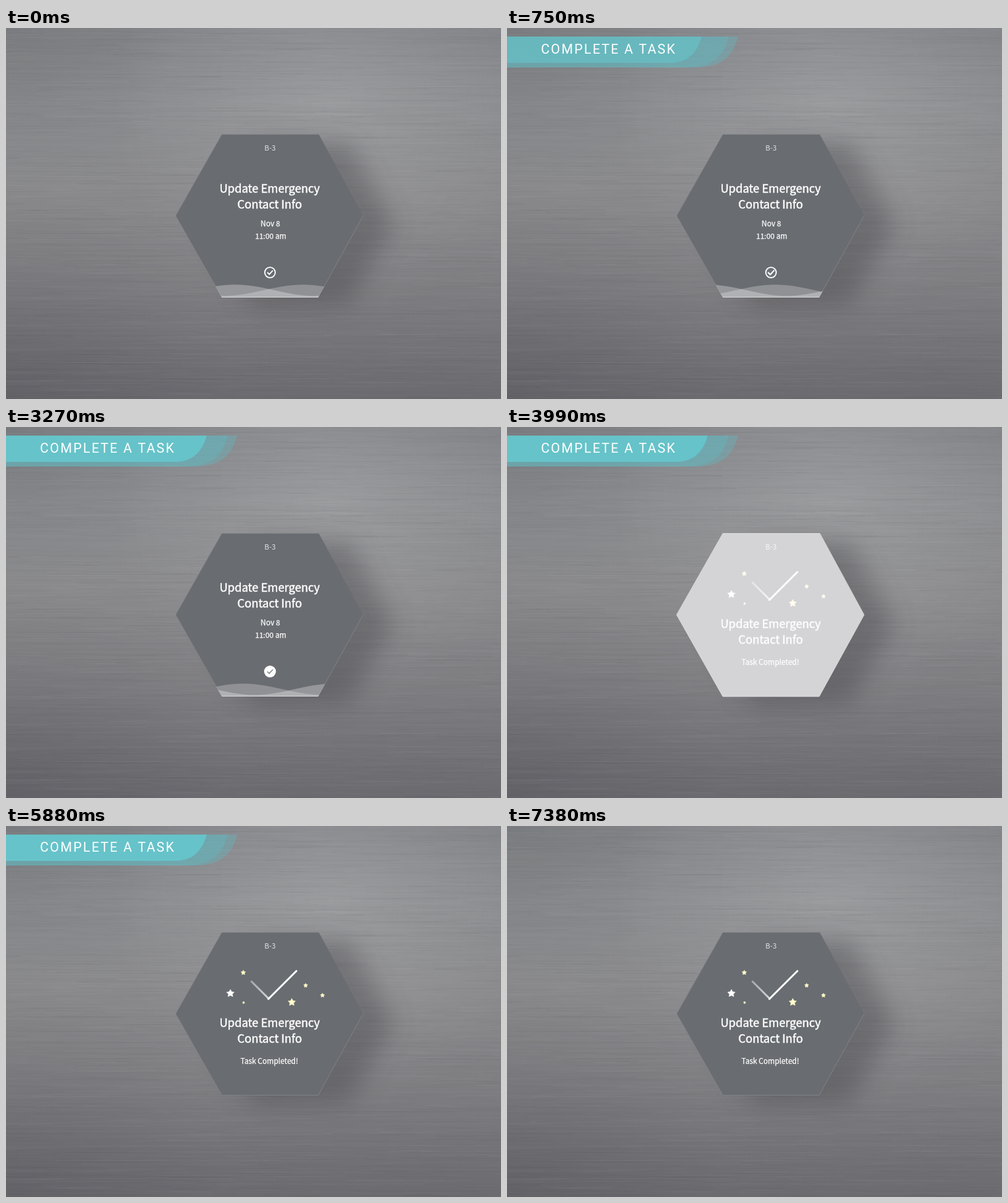
An HTML page with a canvas that plays this animation: 750 px wide and 563 px high, repeating every 7620 ms.

```html
<!DOCTYPE html>
<html lang="en">
<head>
<meta charset="utf-8">
<title>Complete a task</title>
<style>
  html, body { margin: 0; width: 100%; height: 100%; overflow: hidden; background: #838387; }
  canvas, svg { position: absolute; left: 0; top: 0; width: 750px; height: 563px; }
  text { fill: #fff; text-anchor: middle; font-family: "Noto Sans CJK SC", "Noto Sans CJK JP", "Noto Sans", sans-serif; }
  .title { font-size: 17.2px; stroke: #fff; stroke-width: .45px; }
  .small { font-size: 11.2px; stroke: #fff; stroke-width: .25px; }
  .tag { font-size: 11px; fill: #e2e3e4; }
  .label { font: 20px Roboto, sans-serif; letter-spacing: 2.1px; text-anchor: start; }
</style>
</head>
<body>
<canvas id="metal" width="750" height="563"></canvas>
<svg viewBox="0 0 750 563">
  <defs>
    <path id="hex" d="M327 161.500H474L541 285 473 409H327L257 285Z"/>
    <clipPath id="inside"><use href="#hex"/></clipPath>
    <filter id="soft" x="-50%" y="-50%" width="200%" height="200%"><feGaussianBlur stdDeviation="19"/></filter>
    <linearGradient id="shortArm" gradientUnits="userSpaceOnUse" x1="372" y1="236" x2="398" y2="262">
      <stop stop-color="#a9abad"/><stop offset="1" stop-color="#d5d6d7"/>
    </linearGradient>
  </defs>

  <use href="#hex" transform="translate(46 13)" fill="#38383c" opacity=".36" filter="url(#soft)"/>
  <use href="#hex" fill="#696c70"/>
  <path d="M257 285L327 161.500H474" fill="none" stroke="#808387" stroke-width=".8"/>
  <path d="M257 285L327 408.500H473L541 285" fill="none" stroke="#85888b" stroke-width=".8"/>
  <text class="tag" x="400" y="186.300">B-3</text>

  <g id="todo">
    <g clip-path="url(#inside)" fill="#fff">
      <path id="waveA" opacity=".29"/>
      <path id="waveB" opacity=".25"/>
      <path d="M327 408.500H473" stroke="#d5d7d7"/>
    </g>
    <text class="title" x="399.500" y="249.700">Update Emergency</text>
    <text class="title" x="399.500" y="273.700">Contact Info</text>
    <text class="small" x="400.500" y="301.300">Nov 8</text>
    <text class="small" x="401" y="320.300">11:00 am</text>
    <g transform="translate(400 371)" fill="none" stroke-linecap="round" stroke-linejoin="round">
      <circle r="7.900" stroke="#fff" stroke-width="1.800"/>
      <path id="tick" d="M-3.600 .3L-1 2.900 3.800-2.500" stroke="#fff" stroke-width="1.800"/>
      <circle id="disc" r="8.700" fill="#fff"/>
      <path id="doneTick" d="M-3.800 .4L-1.200 3 4-2.600" stroke="#74777b" stroke-width="1.300"/>
    </g>
  </g>

  <g id="done">
    <path d="M372 236L398 262" stroke="url(#shortArm)" stroke-width="2.800" stroke-linecap="round"/>
    <path d="M397.500 262.500L440 220" stroke="#fff" stroke-width="2.800" stroke-linecap="round"/>
    <g id="stars"></g>
    <text class="title" x="399.500" y="304.700">Update Emergency</text>
    <text class="title" x="399.500" y="328.700">Contact Info</text>
    <text class="small" x="399" y="361.300">Task Completed!</text>
    <use id="flash" href="#hex" fill="#fffdff" stroke="#fffdff"/>
  </g>

  <g id="banner">
    <path id="back" d="M-400 13H350C343 42 326 60 286 60H-400Z" fill="#5fb9c1" opacity=".36"/>
    <path id="middle" d="M-400 13H336C329 42 312 60 272 60H-400Z" fill="#5fb9c1" opacity=".36"/>
    <path id="front" d="M-400 13H304C298 36 284 53 255 53H-400Z" fill="#66c3c9"/>
    <text id="label" class="label" x="51.500" y="38.500">COMPLETE A TASK</text>
  </g>
</svg>
<script>
const LOOP = 7620, DONE_AT = 3930, EXIT_AT = 7030;
const el = id => document.getElementById(id);
const ramp = (t, from, to) => Math.min(1, Math.max(0, (t - from) / (to - from)));
const easeOut = p => 1 - (1 - p) ** 3;

function drawMetal() {
  const c = el('metal').getContext('2d');
  let seed = 7;
  const rnd = () => (seed = seed * 16807 % 2147483647) / 2147483647;
  const base = c.createLinearGradient(0, 0, 0, 563);
  [[0, '#818387'], [.2, '#8b8c8f'], [.45, '#8a8a8d'], [.7, '#7e7e82'], [1, '#6a6a6f']]
    .forEach(([at, color]) => base.addColorStop(at, color));
  c.fillStyle = base;
  c.fillRect(0, 0, 750, 563);
  const glow = (x, y, r, rgb, a) => {
    const g = c.createRadialGradient(x, y, 0, x, y, r);
    g.addColorStop(0, `rgba(${rgb},${a})`);
    g.addColorStop(1, `rgba(${rgb},0)`);
    c.fillStyle = g;
    c.fillRect(0, 0, 750, 563);
  };
  glow(490, 110, 330, '255,255,255', .13);
  glow(0, 563, 330, '60,60,66', .2);
  glow(0, 0, 260, '70,74,78', .15);
  for (let i = 0; i < 4200; i++) {
    const tone = rnd() < .5 ? 220 : 40, length = 30 + 200 * rnd() ** 2;
    c.fillStyle = `rgba(${tone},${tone},${tone},${.01 + .02 * rnd()})`;
    c.fillRect(rnd() * 900 - 150, rnd() * 563, length, .6 + rnd());
  }
}

function star(x, y, r, color) {
  let d = '';
  for (let i = 0; i < 10; i++) {
    const a = i * Math.PI / 5 - Math.PI / 2, k = i % 2 ? r * .52 : r;
    d += (i ? 'L' : 'M') + (x + k * Math.cos(a)) + ' ' + (y + k * Math.sin(a));
  }
  return `<path d="${d}Z" fill="${color}" stroke="${color}" stroke-width=".6" stroke-linejoin="round"/>`;
}

function wave(crest) {
  let d = 'M310 412';
  for (let x = 310; x <= 490; x += 4)
    d += `L${x} ${398 - 8.500 * Math.cos((x - crest) * Math.PI / 120)}`;
  return d + 'L490 412Z';
}

const slide = (id, x) => el(id).setAttribute('transform', `translate(${x} 0)`);
const fade = (id, a) => el(id).setAttribute('opacity', a);
const show = (id, on) => el(id).setAttribute('visibility', on ? 'visible' : 'hidden');

function render(t) {
  const done = t >= DONE_AT;
  show('todo', !done);
  show('done', done);

  const drift = Math.min(t, 1560) * .058;
  el('waveA').setAttribute('d', wave(347 - drift));
  el('waveB').setAttribute('d', wave(450 - drift));

  el('tick').setAttribute('transform', `scale(${1 + .3 * ramp(t, 600, 900)})`);
  fade('disc', ramp(t, 720, 1500));
  fade('doneTick', ramp(t, 1900, 3030));
  fade('flash', .8 * (1 - ramp(t, DONE_AT, 4800)) ** 1.5);

  const enter = (from, to) => -370 * (1 - easeOut(ramp(t, from, to)));
  show('banner', t >= 30 && t < 7380);
  slide('back', enter(0, 690));
  slide('middle', enter(40, 780));
  slide('label', enter(0, 690));
  slide('front', enter(100, 1020));
  fade('front', .6 + .4 * ramp(t, 500, 2400));
  slide('banner', -370 * ramp(t, EXIT_AT, 7380) ** 2);
}

const cream = '#fffcc9';
el('stars').innerHTML = star(340, 254, 6, '#fff') + [
  [359.5, 222.5, 3.7], [360, 268, 1.9], [433, 267.5, 5.8], [454, 242, 3.3], [479.5, 257, 3.3]
].map(s => star(...s, cream)).join('');

drawMetal();
const start = performance.now();
function tick() {
  render((performance.now() - start) % LOOP);
  requestAnimationFrame(tick);
}
tick();
</script>
</body>
</html>
```
